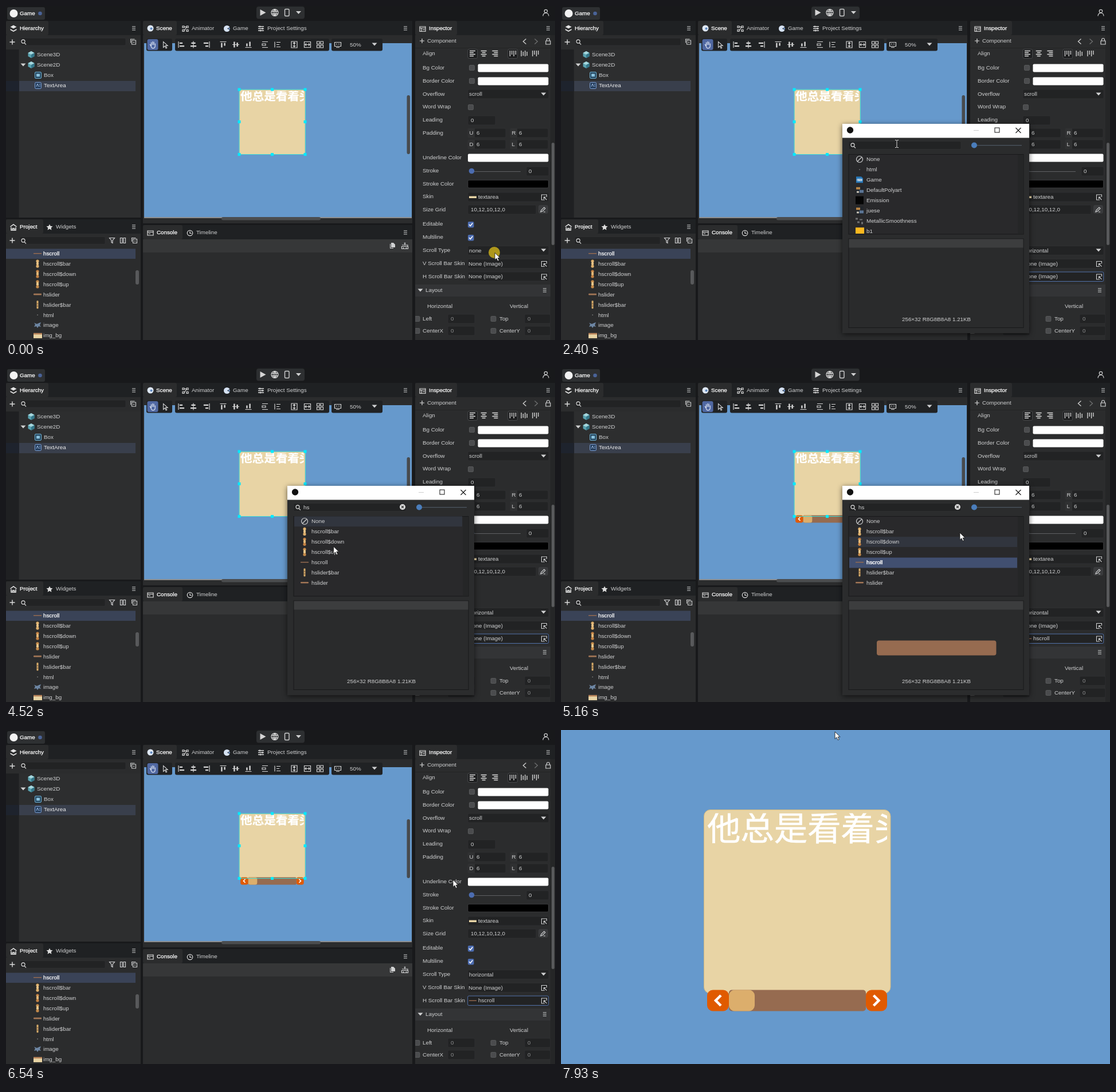
An HTML page that plays this animation: 958x584 px, repeating every 7.99 s.

```html
<!DOCTYPE html>
<html lang="en">
<head>
<meta charset="utf-8">
<title>Scroll bar skin</title>
<style>
html, body { margin: 0; width: 100%; height: 100%; overflow: hidden; background: #18191b; }
svg { display: block; width: 100vw; height: 100vh; }
text { font-family: "Liberation Sans", Arial, sans-serif; white-space: pre; }
.cjk { font-family: "Noto Sans CJK SC", "Noto Sans CJK", sans-serif; }
</style>
</head>
<body>
<svg id="stage" viewBox="0 0 958 584" preserveAspectRatio="none"></svg>
<script>
const LOOP = 7990;
const INK = '#d0d1d2', BG = '#18191b', BAR = '#1f2123', PANEL = '#2b2c2d', FIELD = '#222324';
const SKY = '#6699cc', SAND = '#e8d4a5', BROWN = '#966b50', TAN = '#dcae6c', ORANGE = '#e05a00', BLUE = '#4c6cb0';

// --- drawing helpers -------------------------------------------------
const rect = (x, y, w, h, fill, r = 0, more = '') =>
  `<rect x="${x}" y="${y}" width="${w}" height="${h}" fill="${fill}" rx="${r}" ${more}/>`;
const disc = (x, y, r, fill, more = '') => `<circle cx="${x}" cy="${y}" r="${r}" fill="${fill}" ${more}/>`;
const text = (x, y, s, fill = INK, size = 9.8, more = '') =>
  `<text x="${x}" y="${y + size * .355}" font-size="${size}" fill="${fill}" ${more}>${s}</text>`;
const strong = (x, y, s) => text(x, y, s, '#fff', 9.8, 'stroke="#fff" stroke-width=".25"');
const line = (x, y, d, color = INK, w = 1.2, rot = 0) =>
  `<path transform="translate(${x} ${y}) rotate(${rot})" d="${d}" fill="none" stroke="${color}" stroke-width="${w}"/>`;
const solid = (x, y, d, fill = INK, rot = 0) =>
  `<path transform="translate(${x} ${y}) rotate(${rot})" d="${d}" fill="${fill}"/>`;
const group = (id, body, more = '') => `<g id="${id}" ${more}>${body}</g>`;

const plus = (x, y) => line(x, y, 'M-4.5 0h9M0-4.5v9', '#ddd', 1.4);
const down = (x, y) => solid(x, y, 'M-4.5-2.5h9l-4.5 5z');
const menu = (x, y) => line(x, y, 'M-3-3h6M-3 0h6M-3 3h6', INK, 1.1);
const lens = (x, y) => line(x, y, 'M2 1.5l3 3M3-1a3 3 0 1 1-6 0a3 3 0 1 1 6 0', '#ccc', 1.3);
const copies = (x, y) => line(x, y, 'M-2.5-2.5h7v7h-7zM-4.5 2v-6.5h7M-.5 1h3', INK, 1.1);
const globe = (x, y, c) =>
  line(x, y, 'M6 0a6 6 0 1 1-12 0a6 6 0 1 1 12 0M-6-2h12M-6 2.2h12M0-6v12M0-6c-4 4-4 8 0 12c4-4 4-8 0-12', c, 1.2);
const picker = (x, y) => line(x, y, 'M1 4.5h-5.5v-9h9v4M4.5 4.5l-5-5M-.5 3v-3.5h3.5', INK, 1.1);
const gear = (x, y, c) => line(x, y, 'M-5-3.5h10M-5 0h10M-5 3.5h10M-2-5v3M2.5-1.5v3M-1 2v3', c, 1.3);

const field = (y, x = 806, w = 141, h = 16) => rect(x, y - h / 2, w, h, FIELD, 2, 'stroke="#343536" stroke-width=".6"');
const swatch = (x, y, fill) => rect(x, y - 6.5, 946.5 - x, 14, fill, 2);
const tick = (x, y, on) => on
  ? rect(x - 5, y - 5, 10.5, 10.5, BLUE, 2) + line(x, y, 'M-3 0l2.3 2.5l4-5', '#fff', 1.5)
  : rect(x - 4.5, y - 4.5, 9, 9, '#4b4c4e', 1.5, 'stroke="#646566" stroke-width=".7"');

// small thumbnails of the skin images
const beads = (x, y, a, b) =>
  disc(x, y - 4.5, 2.6, a) + rect(x - 1.6, y - 4, 3.2, 9, b, 1) + disc(x, y, 2.2, b) + disc(x, y + 4.5, 2.6, a);
const thumbs = {
  track: (x, y) => rect(x - 7, y - .7, 14, 1.5, BROWN),
  slider: (x, y) => rect(x - 7, y - 1.5, 14, 2.6, '#a27656', 1),
  bar: (x, y) => beads(x, y, TAN, '#e8c386'),
  down: (x, y) => beads(x, y, '#c48244', '#e3b878'),
  up: (x, y) => beads(x, y, '#c48a4a', '#edc98c'),
  grip: (x, y) => rect(x - 1.5, y - 7, 3, 14, '#d5ab68', 1) + rect(x - 1.5, y - 2, 3, 1, '#6a4b38') + rect(x - 1.5, y + 2, 3, 1, '#6a4b38'),
  dot: (x, y) => rect(x - .7, y - .5, 1.5, 1.2, '#999'),
  none: (x, y) => line(x, y, 'M5.5 0a5.5 5.5 0 1 1-11 0a5.5 5.5 0 1 1 11 0M-4 4l8-8'),
  ktx: (x, y) => solid(x, y, 'M-6-5.5h9l3 3v8h-12z', '#2878b8') + rect(x - 4.5, y - 1.5, 9, 4, '#dce9f4', 1) + text(x - 4, y + .6, 'KTX', '#1d5e96', 4),
  photo: (x, y) => rect(x - 7, y - 7, 14, 14, '#22262b') + rect(x - 6, y - 5, 7, 4, '#b98545') + rect(x, y, 7, 5, '#5b7596') + rect(x - 5, y + 2, 4, 3, '#c9c4b8'),
  black: (x, y) => rect(x - 7, y - 7, 14, 14, '#050505'),
  specks: (x, y) => solid(x, y, 'M-7-5h4v3h-4zM0-3h5v2h-5zM-4 1h4v3h-4zM3 2h3v4h-3z', '#6f7072'),
  gold: (x, y) => rect(x - 7, y - 6, 15, 12, '#fbb81f'),
  bug: (x, y) => solid(x, y, 'M-6-4l5 2l2-1l5-2l-2 5l2 3l-4-1l-2 3l-2-3l-4 1l2-4z', '#6d86a3'),
  cream: (x, y) => rect(x - 7, y - 4, 15, 9, SAND) + rect(x - 7, y - 4, 15, 2.5, '#b98359')
};
const rowsOf = (list, x, y0) => list.map(([kind, name], i) =>
  thumbs[kind](x, y0 + i * 17.9) + text(x + (x > 500 ? 12 : 10), y0 + i * 17.9, name)).join('');
const skins = {
  bar: ['bar', 'hscroll$bar'], down: ['down', 'hscroll$down'], up: ['up', 'hscroll$up'],
  slider: ['slider', 'hslider'], grip: ['grip', 'hslider$bar'], html: ['dot', 'html']
};

// --- the text area, in the size of the running page ------------------
const chevron = (x, s) => line(x, 473, `M${4.5 * s}-9l${-9 * s} 9l${9 * s} 9`, '#fff', 4.5);
const scrollBar = () => rect(293, 454.5, 239, 37, BROWN, 5) + rect(293, 454.5, 45, 37, TAN, 10) +
  rect(255, 454.5, 38, 37, ORANGE, 10) + rect(532, 454.5, 37, 37, ORANGE, 10) + chevron(274.5, 1) + chevron(550, -1);
const textArea = (weight, bar) => rect(249.5, 139.5, 325.5, 321, SAND, 11, 'stroke="#cdb682" stroke-width="1"') +
  `<g clip-path="url(#inner)"><text class="cjk" x="255" y="193" font-size="58.4" font-weight="${weight}" fill="#fff" stroke="#fff" stroke-width=".6">他总是看着头</text></g>` + bar;

// --- panels ----------------------------------------------------------
const tabs = (x, y, w, h, active) => rect(x, y, w, h, PANEL) + rect(x, y, w, 25, BAR) + rect(x, y, active, 25, PANEL, 3) + menu(x + w - 12, y + 13);

function topBar() {
  return rect(2, 2, 66, 22, '#2e3032', 3) + disc(13.5, 13, 7, '#f2f2f2') + strong(24, 13, 'Game') + disc(59.5, 13, 3.3, '#4a6398') +
    rect(437, 1, 84, 21.5, '#2d2f31', 4) + solid(448, 11.5, 'M-4.5-5.5v11l10-5.5z', '#d5d5d5') +
    rect(486.5, 5.5, 7.5, 12, 'none', 1.5, `stroke="${INK}" stroke-width="1.4"`) + down(510.5, 11.5) +
    group('globe', globe(469, 11.5, '#d8d8d8')) + group('globeHot', rect(460, 3, 18, 17, '#3d3f42', 3) + globe(469, 11.5, '#858789')) +
    line(942, 11.5, 'M2.7-2.5a2.7 2.7 0 1 1-5.4 0a2.7 2.7 0 1 1 5.4 0M-5 6c0-7 10-7 10 0');
}

function hierarchy() {
  const cube = (x, y) => solid(x, y, 'M0-6l5.5 3v6l-5.5 3l-5.5-3v-6z', '#5aa2b0') + solid(x, y, 'M0-6l5.5 3l-5.5 3l-5.5-3z', '#a6d7dd') + solid(x, y, 'M0 0l5.5-3v6l-5.5 3z', '#35778a');
  return tabs(0, 26, 235, 344, 74) + solid(13, 39, 'M0-5.5l5.5 3l-5.5 3l-5.5-3zM-5.5 1l5.5 3l5.5-3v2l-5.5 3l-5.5-3z', '#e4e4e4') + strong(24, 39, 'Hierarchy') +
    rect(0, 76, 22.5, 294, '#1f2022') + rect(23, 76, 212, 294, '#2d2e2f') + plus(11, 63) + field(62.5, 25, 184, 13) + lens(30, 63) + copies(222, 62.5) +
    rect(0, 131, 22.5, 18, '#1e232d') + rect(23, 131, 203, 18, '#393f4c') +
    cube(44, 85) + text(54, 85, 'Scene3D') + down(30, 103) + cube(44, 103) + text(54, 103, 'Scene2D') +
    rect(50.5, 115.5, 11, 11, '#24465e', 1.5, 'stroke="#70b2d5"') + rect(53, 118.5, 6, 5, '#8bc3df') + text(66, 121, 'Box') +
    rect(50.5, 133.5, 11, 11, '#27405f', 2, 'stroke="#7d9fd2"') + line(56, 139, 'M-3 2l2-5l2 5M2-2h2M2 1h2', '#a9c3e8', .9) + text(66, 139, 'TextArea', '#eee');
}

function project() {
  const list = [['track', ''], skins.bar, skins.down, skins.up, skins.slider, skins.grip, skins.html, ['bug', 'image'], ['cream', 'img_bg']];
  return tabs(0, 373, 235, 211, 65) + line(13, 387, 'M-5.5-1l5.5-4l5.5 4M-4 0v5h8v-5M-1.5 5v-3h3v3', '#eee', 1.5) + strong(24, 386, 'Project') +
    solid(76, 387, 'M0-5.5l1.6 3.3l3.9.4l-2.8 2.6l.7 3.9l-3.4-1.9l-3.4 1.9l.7-3.9l-2.8-2.6l3.9-.4z', '#ddd') + text(87, 386, 'Widgets') +
    plus(11, 410) + field(410, 24, 149, 13) + lens(30, 411) + line(185, 410, 'M-4.5-4.5h9l-3.5 4.5v4.5l-2-1v-3.5z') +
    line(204, 410, 'M-4.5-4.5h3.5v9h-3.5zM1-4.5h3.5v9h-3.5z') + copies(224, 410) +
    rect(0, 424.5, 226, 17.5, '#3a4357') + rowsOf(list, 55, 432.7) + strong(65, 432.5, 'hscroll') + rect(226, 462, 6, 25, '#58595b', 3);
}

function scene() {
  const align = 'M-5-5.5v11M-2.5-3.2h4v1.2h-4zM-2.5 2h7v1.2h-7z', mid = 'M0-6v12M-3-3.2h6v1.2h-6zM-4.5 2h9v1.2h-9z';
  const box = 'M-5-5.5h10v11h-10z', icons = [
    [306, align, 0], [327, mid, 0], [350, align, 180], [379, align, 90], [401, mid, 90], [423, align, 270],
    [452, 'M-5-5h10M-5 5h10M-5-1.5h6v3h-6z', 0], [474, 'M-5-5v10M-2-4h7M-2 0h5M-2 4h7', 0],
    [503, box + 'M0-4v8M-2-2l2-2l2 2M-2 2l2 2l2-2', 0], [526, box + 'M0-4v8M-2-2l2-2l2 2M-2 2l2 2l2-2', 90],
    [548, 'M-5.5-5.5h4.5v4.5h-4.5zM1-5.5h4.5v4.5h-4.5zM-5.5 1h4.5v4.5h-4.5zM1 1h4.5v4.5h-4.5z', 0],
    [579, 'M-5.5-4h11v7h-11zM-3 5h6M-3-1h2M1-1h2', 0]];
  let s = tabs(239, 26, 470, 354, 59) + disc(252, 39, 5.5, '#dfe8f4') + disc(253.5, 39.5, 2, '#5f87bd') + strong(262, 39, 'Scene') +
    line(313, 39.5, 'M-5-4.5h3v3h-3zM2-4.5h3v3h-3zM-5 2h3v3h-3zM2 2h3v3h-3zM-2-3h4M-2 3.5l4-6', '#ddd') + text(324, 39, 'Animator') +
    disc(385.5, 39.5, 5.5, '#d5e2f3') + solid(386, 39.5, 'M0 0l6-3.5v7z', BAR) + disc(389.5, 39.5, 1.5, '#6d93cc') + text(396, 39, 'Game') +
    gear(445, 39.5, '#ddd') + text(456, 39, 'Project Settings') +
    rect(241, 65, 467, 304, SKY) + rect(241, 369, 467, 2, '#8d8e90') + rect(376, 369, 173, 5.5, '#4b4d4f', 3) + rect(699.5, 156, 5.5, 103, '#484b4e', 3);
  for (const [x, w] of [[245, 45], [295, 269], [568, 89]]) s += rect(x, 57, w, 21.5, '#202224', 3);
  s += rect(246.5, 58, 19, 19, '#5068a2', 3) + line(256, 68, 'M-2.5 2l-2.5-3M-2.5 1v-5.5M-.2 0v-6M2-0v-5.5M4.3 1v-3.5M-4 0l2 4.5c1 2 5 2 6-1l.3-3', '#dde4f3', 1.2) +
    line(278, 68, 'M-3.5-5.5v10l2.7-2.5l2 4l1.5-.8l-2-3.8h3.5z', INK, 1.1);
  for (const [x, d, rot] of icons) s += line(x, 67.5, d, '#d4d4d4', 1.2, rot);
  s += text(600, 67.5, '50%') + down(643, 67);
  s += `<g transform="translate(407 146.5) scale(.352) translate(-249 -139.5)">${textArea(700, group('skinned', scrollBar()))}</g>` +
    rect(407, 146, 115.5, 113.5, 'none', 0, 'stroke="#3fdcd4" stroke-width="1"');
  for (const x of [407, 464.5, 522]) for (const y of [146, 202.5, 259.5])
    if (x !== 464.5 || y !== 202.5) s += rect(x - 2.5, y - 2.5, 5, 5, '#00eaff');
  return s;
}

function consolePanel() {
  return tabs(239, 383, 470, 201, 69) + rect(239, 408, 470, 23, '#363738') + line(252, 397, 'M-5-4h10v8h-10zM-5-1.5h10M-3 1h3', '#ddd') + strong(263, 396, 'Console') +
    line(321, 397, 'M4.7 0a4.7 4.7 0 1 1-9.4 0a4.7 4.7 0 1 1 9.4 0M0-3v3.5h3', '#ddd') + text(332, 396, 'Timeline') +
    solid(674, 419, 'M-2-5h4l3 3v5h-7zM-4-3v8h6v-1h-5v-7z') + line(696, 419, 'M-5.5 5.5h11v-4h-11zM-5-1h10v2M0-1v-4.5M-2.5 5v-2M2.5 5v-2M-1.5-4h3');
}

function inspector() {
  const rows = { 83: 'Align', 108: 'Bg Color', 131: 'Border Color', 154: 'Overflow', 176: 'Word Wrap', 199: 'Leading', 222: 'Padding',
    265: 'Underline Color', 288: 'Stroke', 311: 'Stroke Color', 333: 'Skin', 356: 'Size Grid', 381: 'Editable', 404: 'Multiline',
    427: 'Scroll Type', 450: 'V Scroll Bar Skin', 472.5: 'H Scroll Bar Skin' };
  let s = tabs(714, 26, 244, 558, 73) + line(727, 40, 'M-5-4h10v8.5h-10zM-5-1.5h10M-2-1v5M0 1.5h4', '#ddd') + strong(738, 39, 'Inspector') +
    rect(950, 51, 8, 533, '#252627') + rect(952, 239, 5, 179, '#58595b', 2.5) +
    line(726, 61, 'M-4 0h8M0-4v8', '#ddd') + text(735, 61, 'Component') +
    line(905, 62, 'M2.5-4.5l-5 4.5l5 4.5', '#ccc', 1.4) + line(925, 62, 'M-2.5-4.5l5 4.5l-5 4.5', '#6c6d6e', 1.4) +
    line(946, 62, 'M-4-1h8v6h-8zM-2.5-1v-2a2.5 2.5 0 0 1 5 0v2') + rect(714, 73, 236, .8, '#222324');
  for (const y in rows) s += text(727, +y, rows[y]);
  for (const x of [814, 884]) s += rect(x - 8, 75.5, 16.5, 16, '#1d1e1f', 2, 'stroke="#55575a" stroke-width=".7"');
  [-5, -3, -5].forEach((a, i) => {
    const left = [-5, -3, -2][i];
    s += line(814 + i * 19.7, 83, `M-5-4.5h10M${left}-1.5h${[7, 6, 7][i]}M-5 1.5h10M${left} 4.5h${[7, 6, 7][i]}`, '#ddd', 1.3);
    s += line(884.5 + i * 19.7, 83, `M-5-5v10M-1.7${a}v7M1.7-5v10M5${a}v7`, '#ddd', 1.3);
  });
  for (const y of [108, 131]) s += tick(813, y) + swatch(823.5, y, '#fff');
  s += field(154) + text(808, 154, 'scroll') + down(938, 154) + tick(811, 177) + field(200, 806, 48) + text(811, 200, '0');
  [['U', 806, 222], ['R', 880, 222], ['D', 806, 242], ['L', 880, 242]].forEach(([k, x, y]) => {
    s += field(y, x, 66) + rect(x, y - 8, 12, 16, '#303132') + text(x + 2.5, y, k) + text(x + 15, y, '6');
  });
  s += swatch(806, 265, '#fff') + rect(806, 304.5, 140.5, 13.5, '#000', 2, 'stroke="#454648" stroke-width=".7"') +
    rect(812, 289, 86, 1, '#5f6164') + disc(812.5, 288.5, 4.8, BLUE) + field(289, 908, 39) + text(912, 289, '0') +
    field(334) + rect(808, 332.5, 13, 3.5, SAND) + text(824, 334, 'textarea') + picker(939, 334.5) +
    field(356, 806, 119) + text(811, 355.5, '10,12,10,12,0') + rect(929, 348, 17, 15, '#3a3b3d', 3) + line(937, 356, 'M-4 4l1-3l5-5l2 2l-5 5zM1 4h3') +
    tick(811, 382, 1) + tick(811, 405, 1) + field(427.5) + group('typeNone', text(808, 427.5, 'none')) + group('typeHor', text(808, 427.5, 'horizontal')) + down(938, 427) +
    field(450.5) + text(807, 450.5, 'None (Image)') + picker(939, 451) +
    field(473) + group('focus', rect(805.7, 465, 141, 16.5, 'none', 2, 'stroke="#4f6ea6" stroke-width="1"')) +
    group('skinNone', text(807, 473, 'None (Image)')) + group('skinSet', rect(808, 472.5, 13, 1.4, BROWN) + text(824, 473, 'hscroll')) +
    group('pickHot', rect(932.5, 467, 13, 13, '#77797c', 2)) + picker(939, 473.5) +
    rect(714, 487, 236, 21, '#333436') + down(723, 497) + text(732, 497, 'Layout') + menu(940, 497) +
    text(735, 525, 'Horizontal') + text(879, 525, 'Vertical');
  [[547, 'Left', 'Top'], [568, 'CenterX', 'CenterY']].forEach(([y, a, b]) => {
    s += tick(717.5, y) + text(727, y, a) + field(y, 771, 47) + text(776, y, '0', '#8d8e8f') +
      tick(850.5, y) + text(861, y, b) + field(y, 905, 45) + text(910, y, '0', '#8d8e8f');
  });
  return s + rect(709, 508, 5, 76, BG);
}

function dropDown() {
  return group('menu', rect(806, 437, 141, 66.5, '#1f2022', 2, 'stroke="#47494c" stroke-width=".8"') + rect(807, 0, 139, 15.6, BLUE, 1, 'id="menuHot"') +
    ['none', 'horizontal', 'vertical', 'both'].map((s, i) => text(810, 446.5 + i * 16, s)).join(''));
}

function dialog() {
  const all = [['none', 'None'], skins.html, ['ktx', 'Game'], ['photo', 'DefaultPolyart'], ['black', 'Emission'], ['photo', 'juese'], ['specks', 'MetallicSmoothness'], ['gold', 'b1']];
  const found = [['none', 'None'], skins.bar, skins.down, skins.up, ['track', 'hscroll'], skins.grip, skins.slider];
  return group('dialog', rect(491, 206, 326, 366, PANEL, 0, 'style="filter:drop-shadow(0 2px 5px #0009)"') + rect(491, 206, 326, 24.5, '#fff') +
    disc(504.5, 217, 5.7, '#111') + line(724.5, 217.5, 'M-4.5 0h9', '#ccc', 1) +
    rect(757, 213, 8, 8, 'none', 0, 'stroke="#111" stroke-width="1"') + group('closeHot', rect(780, 206, 37, 24.5, '#e81123')) +
    line(798, 217.5, 'M-4.5-4.5l9 9M-4.5 4.5l9-9', '#111', 1.1) +
    field(243.5, 502, 196, 14) + lens(509, 244) + group('caret', rect(519, 238, 1, 11, '#ddd')) +
    group('query', text(519, 243.5, 'hs') + disc(692, 243, 5, '#ddd') + line(692, 243, 'M-2-2l4 4M-2 2l4-4', '#333', 1.2)) +
    rect(721, 243.2, 83, 1, '#56616f') + disc(721, 243.5, 5, '#4a7dbb') +
    rect(502, 259.5, 305, 139.5, '#29292b', 0, 'stroke="#18191a"') + rect(797, 260, 9.5, 138.5, '#252627') +
    rect(503, 0, 293, 17.9, '#31353e', 0, 'id="rowHot"') + group('picked', rect(503, 331.5, 293, 18, '#414f70')) +
    `<g clip-path="url(#list)">${group('all', rowsOf(all, 521, 268))}${group('found', rowsOf(found, 521, 268))}</g>` + group('pickedName', strong(533, 339.6, 'hscroll')) +
    rect(502, 407, 305, 155.5, '#2a2b2c', 0, 'stroke="#18191a"') + rect(502.5, 407.5, 304, 15, '#3c3d3e') +
    group('preview', rect(551, 476.5, 208.5, 26, BROWN, 4)) + text(595, 548, '256×32 R8G8B8A8 1.21KB'));
}

function typing() {
  const word = (x, n, s, c = '#1d7ad6') => text(x, 281, n, c, 11, 'class="cjk"') + text(x + 10, 281, s, c, 14, 'class="cjk"');
  const sheet = (id, w, typed, words) => group(id, rect(521, 249.5, w, 44.5, '#fff', 1) +
    solid(521 + w, 250, 'M-33 0h33v22c-5-9-14-4-19-11c-4-4-9-2-14-11z', '#fbe3df') + solid(521 + w, 252, 'M-18 3l18-3v9c-7-5-11-2-18-6z', '#f6c7c1') +
    text(530, 259, typed, '#1d7ad6', 12, 'class="cjk"') + rect(typed === 'h' ? 538 : 546, 252.5, 1, 13, '#111') +
    words.map((s, i) => word(530 + i * 49.7, i + 1, s, i ? '#1d7ad6' : '#ea3323')).join('') + text(729, 281, 5, '#1d7ad6', 11, 'class="cjk"') +
    rect(738.5, 271, 18.5, 19, '#d695c8', 1) + rect(742, 276, 12, 9, '#b268ae', 3) + solid(761.5, 288, 'M-3-1.5h6l-3 3z', '#1d7ad6') +
    line(521 + w - 35, 282, 'M2-3.5l-3 3.5l3 3.5', '#d5dbe2') + line(521 + w - 23, 282, 'M-1.5-3.5l3 3.5l-3 3.5', '#1d7ad6') + line(521 + w - 10.5, 282, 'M-3.5-1.5l3.5 3l3.5-3', '#1d7ad6'));
  return sheet('imeA', 287, 'h', ['和', '好', '会', '还']) + sheet('imeB', 296, "h's", ['还是', '喝水', '会上', '合适']);
}

const page = () => group('page', rect(0, 0, 958, 584, SKY) + textArea(400, scrollBar()));
const pointer = () => group('pointer', disc(-1, -.5, 10, '#b9a01c', 'id="click" opacity=".93"') +
  group('arrow', '<path d="M0 0v12.5l2.9-2.7l2.2 4.7l2.2-1l-2.2-4.5h4z" fill="#fff" stroke="#111" stroke-width=".8"/>') +
  group('beam', line(0, 0, 'M-3-6.5h2.2l.8.8l.8-.8h2.2M0-6v12M-3 6.5h2.2l.8-.8l.8.8h2.2', '#111', 2.2) + line(0, 0, 'M-3-6.5h2.2l.8.8l.8-.8h2.2M0-6v12M-3 6.5h2.2l.8-.8l.8.8h2.2', '#eee', 1)));

const stage = document.getElementById('stage');
stage.innerHTML = '<defs><clipPath id="inner"><rect x="255" y="145.5" width="314" height="309"/></clipPath>' +
  '<clipPath id="list"><rect x="503" y="260" width="293" height="138"/></clipPath></defs>' + rect(0, 0, 958, 584, BG) +
  [topBar, hierarchy, project, scene, consolePanel, inspector, dropDown, dialog, typing, page, pointer].map(f => f()).join('');

// --- motion ----------------------------------------------------------
const el = {};
stage.querySelectorAll('[id]').forEach(n => el[n.id] = n);
const show = (id, on) => el[id].style.display = on ? '' : 'none';

const path = [
  [0, 853, 431.5], [140, 853, 431.5], [600, 897, 467], [820, 897, 467], [1280, 940, 474], [1830, 940, 474], [2390, 586, 241],
  [2650, 587, 237], [4330, 587, 237], [4620, 566, 340], [4860, 566, 340], [5160, 696, 288], [5220, 696, 288], [5770, 800, 216],
  [6170, 800, 216], [6350, 855, 290], [6540, 780, 262], [6600, 780, 262], [6830, 436, 34], [6960, 510, 26], [7190, 469, 11],
  [7790, 469, 11], [7930, 478, 3]];
const clicks = [[0, 140], [630, 800], [1630, 1770], [4680, 4820], [6040, 6180], [7580, 7720]];

function cursorAt(t) {
  const i = path.findIndex(p => p[0] > t);
  if (i < 1) return path[i ? path.length - 1 : 0].slice(1);
  const [t0, x0, y0] = path[i - 1], [t1, x1, y1] = path[i];
  const p = (t - t0) / (t1 - t0), e = p * p * (3 - 2 * p);
  return [x0 + (x1 - x0) * e, y0 + (y1 - y0) * e];
}

function draw(t) {
  const within = (a, b) => t >= a && t < b;
  const [x, y] = cursorAt(t), open = within(1830, 6110);

  show('menu', within(140, 730));
  const item = Math.max(0, Math.min(3, Math.floor((y - 438.5) / 16)));
  el.menuHot.setAttribute('y', 438.7 + item * 16);
  show('typeNone', t < 730);
  show('typeHor', t >= 730);
  show('pickHot', within(1160, 1830));
  show('focus', within(1700, 7580));

  const picked = t >= 4750;
  for (const id of ['skinned', 'skinSet', 'picked', 'pickedName', 'preview']) show(id, picked);
  show('skinNone', !picked);

  show('dialog', open);
  show('closeHot', x > 780 && y < 230);
  show('caret', within(2470, 3200) && (t - 2470) % 1060 < 530);
  show('query', t >= 3830);
  show('all', t < 3900);
  show('found', t >= 3900);
  show('imeA', within(3200, 3410));
  show('imeB', within(3410, 3830));

  // the list highlight trails the pointer a little
  const [hx, hy] = cursorAt(Math.max(0, t - 80));
  const row = Math.floor((hy - 259.5) / 18);
  show('rowHot', hx > 503 && hx < 796 && row >= 0 && row < (t < 3900 ? 8 : 7));
  el.rowHot.setAttribute('y', 259.3 + row * 17.9);

  const hot = t >= 7120;
  show('globe', !hot);
  show('globeHot', hot);
  show('page', t >= 7860);

  const beam = open && x > 502 && x < 698 && y > 233 && y < 252;
  el.pointer.setAttribute('transform', `translate(${x} ${y})`);
  show('beam', beam);
  show('arrow', !beam);
  show('click', clicks.some(c => within(...c)));
}

function tickFrame() {
  draw(performance.now() % LOOP);
  requestAnimationFrame(tickFrame);
}
tickFrame();
</script>
</body>
</html>
```
